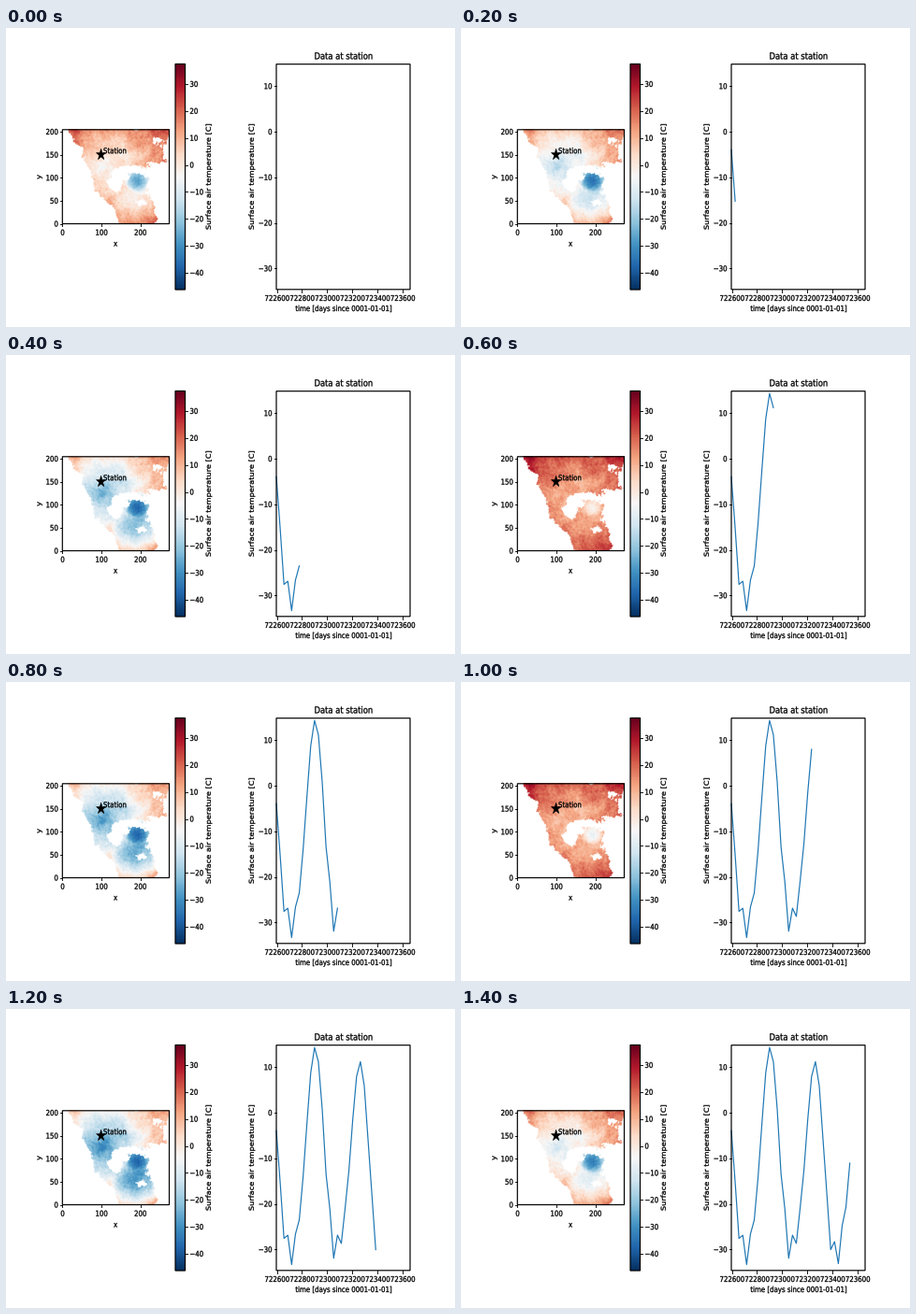
Animation of 480x320 px, one loop 1600 ms. Source, as a matplotlib script:

```python
import numpy as np
import matplotlib.pyplot as plt
from matplotlib.animation import FuncAnimation
from matplotlib.patches import PathPatch, Polygon, Rectangle
from matplotlib.path import Path
from matplotlib.textpath import TextPath
from matplotlib.transforms import Affine2D

W, H, DPI = 480, 320, 80
PT = 72 / DPI                      # points per pixel
EM = 7.0, 8.23                     # the whole scene is taller than wide
TICK = 2.4, 2.9
VMIN, VMAX = -46.3, 37.3
MAP = 60.3, 108.8, 174.5, 209.5    # left, top, right, bottom
BAR = 181, 38.5, 191.5, 280
PLOT = 289, 38.7, 432, 279.8
CMAP = plt.get_cmap("RdBu_r")

fig = plt.figure(figsize=(W / DPI, H / DPI), dpi=DPI, facecolor="white")
ax = fig.add_axes([0, 0, 1, 1])
ax.axis("off")


def text(s, x, y, ha=0.5, size=1, up=False):
    glyphs = TextPath((0, 0), s, size=1)
    place = Affine2D().translate(-ha * glyphs.get_extents().x1, 0).scale(size)
    if up:
        place.rotate_deg(90)
    place.scale(EM[0], -EM[1]).translate(x, y)
    ax.add_patch(PathPatch(place.transform_path(glyphs), fc="black", ec="black",
                           lw=0.3 * PT, zorder=5))


def segment(xs, ys):
    ax.plot(xs, ys, color="black", lw=0.9 * PT, zorder=4)


def frame_box(box):
    left, top, right, bottom = box
    ax.add_patch(Rectangle((left, top), right - left, bottom - top, fill=False,
                           ec="black", lw=1.2 * PT, snap=False, zorder=4))


def x_tick(x, bottom, value):
    segment([x, x], [bottom, bottom + TICK[1]])
    text(str(value), x, bottom + 12.2)


def y_tick(x, y, value, side=-1):
    segment([x, x + side * TICK[0]], [y, y])
    text(str(value).replace("-", "\u2212"), x + side * 4.9, y + 3,
         ha=1 if side < 0 else 0)


# Station record: yearly cycle, slow drift and an alternating winter swing.
month = np.arange(32)
year, season = np.divmod(month, 12)
peak = 9.89 + 0.2 * np.sin(2 * np.pi * month / 33)
station = (-11.3 + 21.5 * np.cos(np.pi / 6 * (month - peak))
           + 2.8 * np.cos(np.pi / 3 * season + 1.81)
           + 1.5 * np.cos(np.pi / 12 * (month - 11))
           - 3.2 * (-1.0) ** (season + year) * np.exp(-((season - 3.3) / 2) ** 2))
warmth = np.interp(station, [-33, 10], [0, 1])

rng = np.random.default_rng(4)
gx, gy = np.meshgrid(np.linspace(MAP[0], MAP[2], 275), np.linspace(MAP[1], MAP[3], 205))


def noise(width):
    ky, kx = np.fft.fftfreq(gx.shape[0])[:, None], np.fft.fftfreq(gx.shape[1])
    blur = np.exp(-2 * (np.pi * width) ** 2 * (kx ** 2 + ky ** 2))
    out = np.fft.ifft2(np.fft.fft2(rng.normal(size=gx.shape)) * blur).real
    return out / out.std()


coast_x, coast_y = (g + noise(4) + 0.8 * noise(1.3) for g in (gx, gy))
relief = 1.6 * noise(8) + 1.4 * noise(1.5)


def ellipse(x, y, rx, ry):
    return ((coast_x - x) / rx) ** 2 + ((coast_y - y) / ry) ** 2 < 1


def distance(x, y):
    return np.hypot(gx - x, gy - y)


outline = [(67, 107), (176, 107), (176, 118), (165, 127), (172, 143), (150, 146),
           (151, 177), (159, 190), (160, 212), (120, 212), (116, 195), (92, 172),
           (90, 150), (80, 137), (83, 130), (73, 124)]
points = np.column_stack([coast_x.ravel(), coast_y.ravel()])
land = Path(outline).contains_points(points).reshape(gx.shape)
arctic = ellipse(133, 156, 21, 8) | ellipse(117, 167, 8, 8)
hudson, caspian = ellipse(144, 187, 5, 4), ellipse(161, 121, 4, 4)
land = land & ~(arctic | hudson | caspian) | ellipse(140, 163, 11, 6.5)

siberia = -34 + 0.72 * distance(105, 148)
canada = -31 + 0.035 * distance(138, 181) ** 2
winter = np.minimum(np.minimum(siberia, canada), 8)
summer = 5 + 0.32 * distance(125, 160)
ice_slope = 0.12 * distance(140, 163) ** 2


def air_map(warm):
    temp = warm * summer + (1 - warm) * winter
    ice = -37 + 35 * warm ** 3 + ice_slope
    temp = np.minimum(temp, ice) + relief
    rgb = CMAP((temp - VMIN) / (VMAX - VMIN))[..., :3]
    return np.where(land[..., None], rgb, 1.0)


def extent(box):
    return box[0], box[2], box[3], box[1]


def temp_y(t):
    return 111 - 4.877 * t


image = ax.imshow(air_map(warmth[0]), extent=extent(MAP), aspect="auto", zorder=1)
ax.imshow(np.linspace(1, 0, 256)[:, None], cmap=CMAP, extent=extent(BAR),
          aspect="auto", zorder=1)
for box in (MAP, BAR, PLOT):
    frame_box(box)

for v in (0, 100, 200):
    x_tick(MAP[0] + v * 0.416, MAP[3], v)
for v in range(0, 201, 50):
    y_tick(MAP[0], MAP[3] - v * 0.4925, v)
text("x", 117, 233.5)
text("y", 37.3, 159.5, up=True)

for v in range(-40, 31, 10):
    y_tick(BAR[2], 146.5 - v * 2.885, v, side=1)
text("Surface air temperature [C]", 218.8, 159.5, up=True)

for k in range(6):
    x_tick(289.6 + 26.88 * k, PLOT[3], 722600 + 200 * k)
for v in range(-30, 11, 10):
    y_tick(PLOT[0], temp_y(v), v)
text("Data at station", 360.5, 33.4, size=1.2)
text("time [days since 0001-01-01]", 360.7, 303)
text("Surface air temperature [C]", 264.8, 159.5, up=True)

angle = np.pi * np.arange(10) / 5
radius = np.where(np.arange(10) % 2, 0.382, 1)
ax.add_patch(Polygon(np.column_stack([101.6 + 5.4 * radius * np.sin(angle),
                                      135.5 - 6.4 * radius * np.cos(angle)]),
                     fc="black", ec="black", lw=0.5 * PT, zorder=5))
text("Station", 104, 134.2, ha=0)

curve_x = PLOT[0] + (PLOT[2] - PLOT[0]) / 35 * month
curve, = ax.plot([], [], color="tab:blue", lw=1.2 * PT, zorder=3)
ax.set_xlim(0, W)
ax.set_ylim(H, 0)


def draw(n):
    now = max(0, 5 * n - 4)        # five months per step
    image.set_data(air_map(warmth[now]))
    curve.set_data(curve_x[:now + 1], temp_y(station[:now + 1]))
    return image, curve


anim = FuncAnimation(fig, draw, frames=8, interval=200, repeat=True, repeat_delay=0)
plt.show()
```
